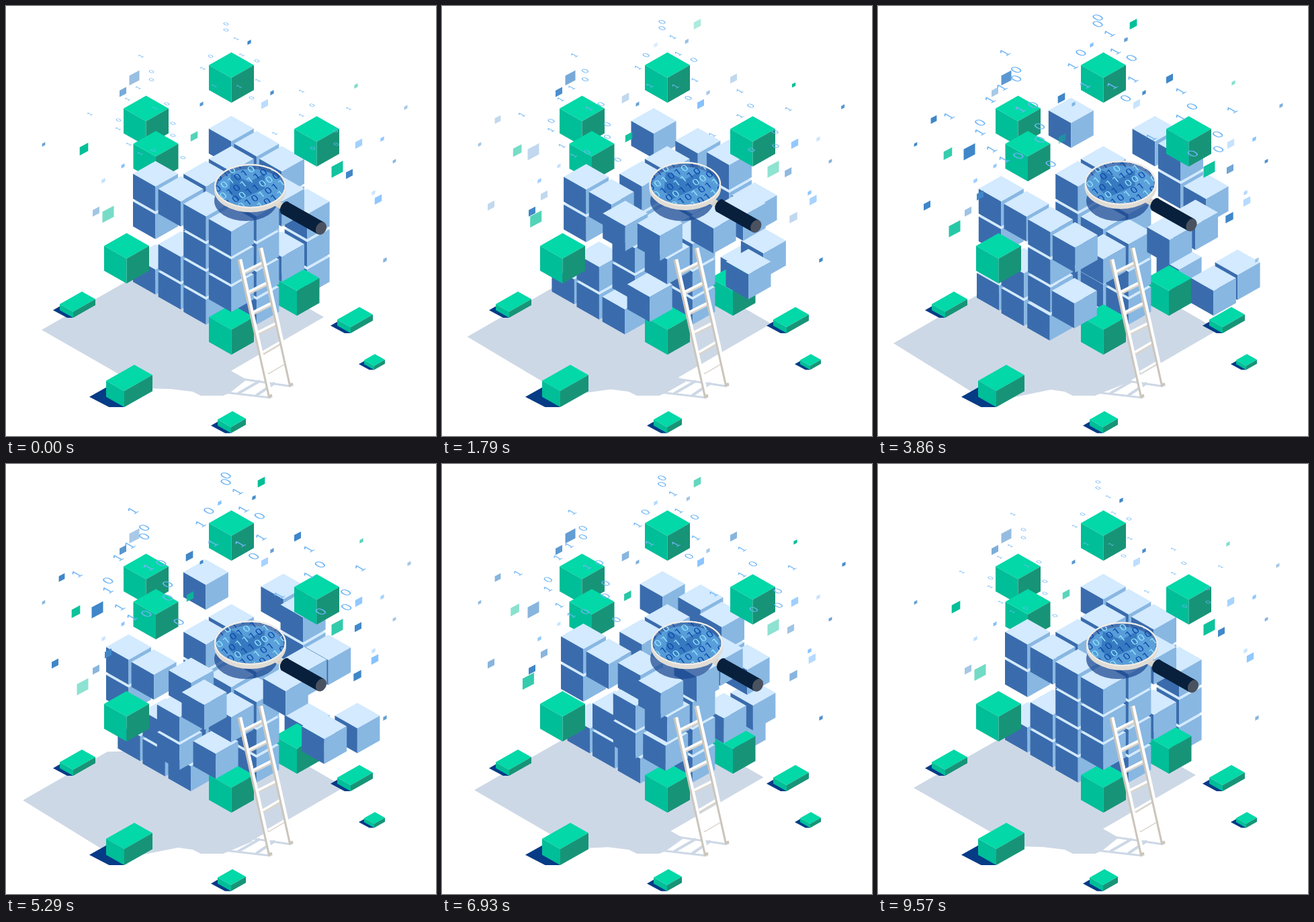
Recreate the animation shown at these times as an HTML page with a canvas. Size 640 by 640 pixels, loop 9.64 s.

```html
<!DOCTYPE html>
<html lang="en">
<head>
<meta charset="utf-8">
<title>Data cube</title>
<style>
html, body { margin: 0; width: 100%; height: 100%; overflow: hidden; background: #fff; }
canvas { display: block; width: 640px; height: 640px; }
</style>
</head>
<body>
<canvas id="stage" width="640" height="640"></canvas>
<script>
const ctx = document.getElementById('stage').getContext('2d');
const LOOP = 9640, SLOPE = 0.567;
const BLUE = ['#d3eaff', '#3a6cad', '#88b7e2'];
const GREEN = ['#02d8a8', '#00be98', '#179477'];
const NAVY = '#063b86', SHADE = '#cdd8e6', BEIGE = '#d9d4cb';

// Smooth track through a few values, without overshoot
function track(values, end = 8400) {
  const ts = [0, 1000, 2570, 3860, 5290, 6930, end];
  const vs = [0, ...values, 0];
  const rise = vs.slice(1).map((v, n) => (v - vs[n]) / (ts[n + 1] - ts[n]));
  const tan = vs.map((_, n) => {
    const a = rise[n - 1], b = rise[n];
    return a * b > 0 ? 2 * a * b / (a + b) : 0;
  });
  return t => {
    if (t >= end) return 0;
    let n = 0;
    while (t >= ts[n + 1]) n++;
    const d = ts[n + 1] - ts[n], u = (t - ts[n]) / d, w = 1 - u;
    return vs[n] * w * w * (1 + 2 * u) + vs[n + 1] * u * u * (3 - 2 * u) +
      d * u * w * (tan[n] * w - tan[n + 1] * u);
  };
}

const pace = {
  P: track([.12, .75, 1, .79, .15]),
  Q: track([.05, .43, .98, 1, .3]),
  M: track([.07, .53, 1, .96, .23]),
  R: track([.23, .91, 1, .54, .06]),
  T: track([.17, .83, 1, .71, .1]),
  U: track([.1, .65, 1, .86, .17]),
  S: track([.13, .87, 1, .93, .167]),
  D: track([.09, .62, 1, 1, .62], 9500)
};
const glassX = track([-1.3, -2, -2.5, 0, 1], 9500);
const glassY = track([-2, -4, -5, -2, -1.7], 9500);

// Outward directions of the four sides
const dirs = { l: [-1, 1], r: [1, 1], b: [1, -1], k: [-1, -1] };

// Keys are steps left, steps right and layer, counted from the front corner
const moves = {
  303: ['l', 40, 'Q'], 203: ['l', 40, 'Q'], 103: ['l', 41, 'R'], '003': ['l', 42, 'M'],
  302: ['l', 40, 'Q'], 102: ['l', 41, 'M'],
  201: ['l', 43, 'R'], 101: ['l', 41, 'M'], '001': ['l', 43, 'R'],
  300: ['l', 42, 'R'], 200: ['l', 43, 'R'], 100: ['l', 42, 'R'],
  '013': ['r', 61, 'T'], '023': ['r', 62, 'R'], '021': ['r', 89, 'T'], '031': ['r', 87, 'U'],
  '032': ['b', 40, 'P'], 132: ['b', 40, 'P'], 133: ['b', 40, 'P'], 233: ['b', 40, 'Q'],
  333: ['k', 48, 'P']
};
const fixed = '223 213 110 111 112 120 121 122 210 211 212 002 012 011 010 030'.split(' ');
const greens = { '020': [433, 386], '000': [335.5, 444] };
const cubes = [...Object.keys(moves), ...fixed, ...Object.keys(greens)]
  .map(key => ({ key, pos: [...key].map(Number) }))
  .sort(({ pos: a }, { pos: b }) => b[0] - a[0] || b[1] - a[1] || a[2] - b[2]);

function poly(color, ...pts) {
  ctx.fillStyle = color;
  ctx.beginPath();
  pts.forEach(([x, y]) => ctx.lineTo(x, y));
  ctx.closePath();
  ctx.fill();
}

function line(color, width, x1, y1, x2, y2, cap = 'butt') {
  ctx.strokeStyle = color;
  ctx.lineWidth = width;
  ctx.lineCap = cap;
  ctx.beginPath();
  ctx.moveTo(x1, y1);
  ctx.lineTo(x2, y2);
  ctx.stroke();
}

function oval(color, x, y, rx, ry, turn = 0) {
  ctx.fillStyle = color;
  ctx.beginPath();
  ctx.ellipse(x, y, rx, ry, turn, 0, Math.PI * 2);
  ctx.fill();
}

// Isometric box placed by the rear corner of its top
function box(x, y, colors, l = 33.5, r = 33.5, h = 37) {
  const west = [x - l, y + l * SLOPE], east = [x + r, y + r * SLOPE];
  const south = [x + r - l, y + (l + r) * SLOPE];
  const down = ([px, py]) => [px, py + h];
  poly(colors[0], [x, y], east, south, west);
  poly(colors[1], west, south, down(south), down(west));
  poly(colors[2], south, east, down(east), down(south));
}

function slab(x, y, l, r, h, cast) {
  const wx = x - l, wy = y + l * SLOPE + h;
  const sx = x + r - l, sy = y + (l + r) * SLOPE + h;
  poly(NAVY, [wx - cast, wy], [wx, wy - cast * SLOPE], [sx, sy], [sx - cast * .9, sy]);
  box(x, y, GREEN, l, r, h);
}

function drawShadow(t) {
  const s = pace.S(t);
  poly(SHADE,
    [53 - 30 * s, 482 + 20 * s], [188 - 40 * s, 405 + 25 * s], [400, 421],
    [473 + 33 * s, 463 + 19 * s], [335 + 33 * s, 543 + 19 * s],
    [358 + 10 * s, 556 + 6 * s], [333, 576], [323, 580], [290, 580], [278, 574],
    [245 + 12 * s, 570 + s], [205 - 40 * s, 569 + 21 * s]);
  line(SHADE, 3, 325, 575, 394, 583);
  line(SHADE, 3, 350, 555, 424, 566);
  line(SHADE, 4, 345, 577, 378, 558);
  line(SHADE, 4, 372, 580, 400, 561);
}

function drawCubes(t) {
  for (const { key, pos: [i, j, k] } of cubes) {
    if (greens[key]) {
      box(...greens[key], GREEN);
      continue;
    }
    let x = 335.3 + 37.6 * (j - i), y = 298 - 22.4 * (i + j) + 41.2 * (3 - k);
    if (moves[key]) {
      const [side, reach, name] = moves[key], d = reach * pace[name](t);
      x += dirs[side][0] * d;
      y += dirs[side][1] * d * SLOPE;
    }
    box(x, y, BLUE);
  }
}

function drawLadder() {
  for (let n = 0; n < 6; n++) {
    const x = 352 + 7.6 * n, y = 397.5 + 29.7 * n;
    const w = n > 3 ? 27 : 32;
    line(BEIGE, n > 4 ? 3 : 5, x, y + 1, x + w, y - 15);
    line('#fff', 3.6, x, y - 1, x + w, y - 17);
  }
  for (const [x, y] of [[347.5, 377], [378.5, 360]]) {
    line('#cbc6bc', 6.5, x, y, x + 46, y + 206);
    line('#fff', 4, x + 1.7, y, x + 46.8, y + 201);
  }
}

const lensRows = ['0101011010', '1001010101', '0010111010', '0100110001', '1101010110', '0010101101'];

function drawGlass(t) {
  oval('rgba(29,72,145,.72)', 357, 290, 47, 30);
  ctx.save();
  ctx.translate(glassX(t), glassY(t));
  line(BEIGE, 10, 399, 291, 414, 300);
  line('#08203c', 20, 414, 300, 469, 331);
  oval('#08203c', 415, 300, 6, 10, .5);
  oval('#4a5260', 469, 331, 7.5, 10, .5);

  // Rim is a thick band, open where the lens sits
  ctx.fillStyle = '#e0dcd5';
  ctx.beginPath();
  ctx.ellipse(363.5, 268, 53.5, 33, 0, Math.PI, 0);
  ctx.lineTo(417, 274);
  ctx.ellipse(363.5, 274, 53.5, 33, 0, 0, Math.PI);
  ctx.closePath();
  ctx.ellipse(363.5, 268, 51, 30.5, 0, 0, Math.PI * 2);
  ctx.fill('evenodd');
  ctx.strokeStyle = '#f3f1ed';
  ctx.lineWidth = 1.6;
  ctx.beginPath();
  ctx.ellipse(363.5, 268, 52.3, 32, 0, 0, Math.PI * 2);
  ctx.stroke();

  ctx.beginPath();
  ctx.ellipse(363.5, 268, 51, 30.5, 0, 0, Math.PI * 2);
  ctx.clip();
  ctx.fillStyle = 'rgba(58,103,168,.82)';
  ctx.fill();
  oval('rgba(92,165,224,.85)', 363.5, 273, 50, 30.5);
  poly('rgba(40,105,180,.65)', [335, 249], [362, 262], [385, 249], [385, 272], [345, 290], [332, 278]);

  ctx.font = '17px Roboto, sans-serif';
  ctx.textAlign = 'center';
  ctx.textBaseline = 'middle';
  const slide = 8 * pace.D(t);
  ctx.transform(.87, -.5, .5, .62, 363, 268);
  lensRows.forEach((row, r) => {
    [...row].forEach((digit, c) => {
      ctx.fillStyle = (r * 3 + c * 2) % 7 < 3 ? '#8ce2ff' : '#0c4cae';
      ctx.fillText(digit, (c - 4.5) * 11.5 - slide, (r - 2.5) * 17);
    });
  });
  ctx.restore();
}

const zeros = [
  [328, 27], [328, 36], [305, 75], [374, 82], [217, 98], [217, 110], [366, 137], [240, 146],
  [168, 170], [249, 175], [249, 193], [220, 215], [264, 226], [456, 148], [491, 186],
  [492, 206], [457, 212]
];
const ones = [
  [343, 49], [201, 75], [351, 73], [293, 93], [310, 119], [347, 120], [375, 111], [197, 122],
  [181, 139], [222, 152], [125, 161], [167, 183], [183, 206], [200, 220], [400, 190],
  [440, 127], [510, 153], [440, 163]
];

function drawDigits(t) {
  const d = pace.D(t), spread = 1 + .095 * d, size = .5 + .5 * d;
  ctx.font = '19px Lato, sans-serif';
  ctx.textAlign = 'center';
  ctx.textBaseline = 'middle';
  ctx.fillStyle = '#6fb6f6';
  [zeros, ones].forEach((list, digit) => {
    for (const [x, y] of list) {
      ctx.save();
      ctx.translate(328 + (x - 328) * spread, 127 + (y - 127) * spread);
      ctx.transform(.87 * size, -.5 * size, .87 * size, .5 * size, 0, 0);
      ctx.fillText(digit, 0, 0);
      ctx.restore();
    }
  });
}

// Flakes: x, y, half width, drift
const flakes = {
  '#3f87c9': {
    steady: [[362, 54, 2.6, 7], [191, 107, 7.5, 0], [174, 128, 5, 0], [396, 129, 2.6, 0],
      [595, 151, 2.5, 5], [291, 146, 2.5, 0], [56, 206, 2.3, 0], [134, 306, 5, 0],
      [511, 250, 5, 13], [578, 231, 2.4, 0], [564, 378, 2.6, 0]],
    rising: [[434, 108, 5, 0], [273, 137, 5.3, 0], [83, 169, 4.4, 0], [136, 217, 8.5, 0],
      [73, 297, 5, 0], [152, 282, 5, 0], [523, 315, 5.7, 0]]
  },
  '#86c2ff': {
    steady: [[385, 146, 5, 0], [174, 238, 2.5, 0], [145, 260, 2.7, 0], [525, 205, 5.2, 0],
      [560, 198, 2.6, 0], [547, 278, 2.6, 0], [554, 288, 5.2, -5]],
    rising: [[318, 58, 2.6, 0]]
  },
  '#03bf98': {
    steady: [[521, 119, 2.6, 8], [116, 213, 6.3, -12], [152, 310, 8.5, -38],
      [280, 194, 5.2, -6], [493, 243, 8.5, 0]],
    rising: [[380, 27, 5.3, 0]]
  }
};

function drawFlakes(t) {
  const d = pace.D(t);
  let n = 0;
  for (const [color, { steady, rising }] of Object.entries(flakes)) {
    [...steady, ...rising].forEach(([x, y, w, drift], index) => {
      const glow = .72 + .28 * Math.cos(2 * Math.PI * (2 * t / LOOP + n++ * .37));
      ctx.globalAlpha = index < steady.length ? glow : d;
      const cx = x + drift * d, cy = y - drift * SLOPE * d;
      poly(color, [cx - w, cy - .45 * w], [cx + w, cy - 1.5 * w],
        [cx + w, cy + .45 * w], [cx - w, cy + 1.5 * w]);
    });
  }
  ctx.globalAlpha = 1;
}

function draw(now) {
  const t = now % LOOP;
  ctx.fillStyle = '#fff';
  ctx.fillRect(0, 0, 640, 640);
  drawShadow(t);
  box(208.5, 133.5, GREEN);
  box(223, 186, GREEN);
  drawCubes(t);
  box(335.5, 69, GREEN);
  box(462.5, 164, GREEN);
  box(179.5, 338, GREEN);
  slab(113, 425, 33, 20, 9, 10);
  slab(526, 448, 33, 20, 9, 10);
  slab(549, 518, 16, 15, 6, 8);
  slab(191, 534, 42, 27, 24, 25);
  slab(337, 603, 22, 20, 9, 10);
  drawLadder();
  drawGlass(t);
  drawFlakes(t);
  drawDigits(t);
}

const start = performance.now();
function tick() {
  draw(performance.now() - start);
  requestAnimationFrame(tick);
}
tick();
</script>
</body>
</html>
```
